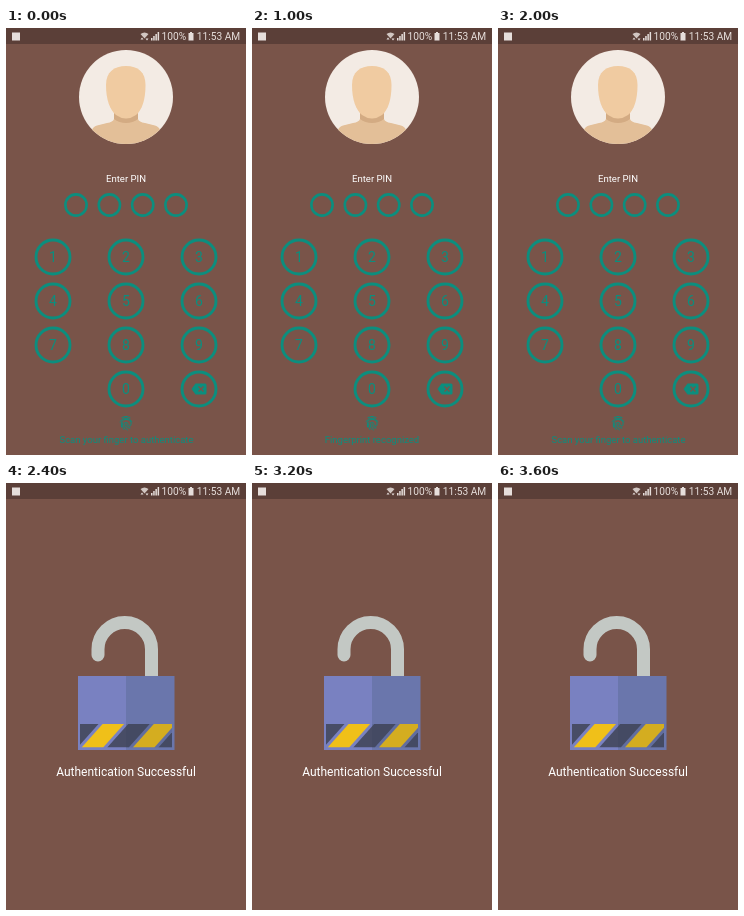
An HTML page that plays this animation: 240x427 px, repeating every 3.8 s.

```html
<!DOCTYPE html>
<html lang="en">
<head>
<meta charset="utf-8">
<title>PIN unlock</title>
<style>
  html, body { margin: 0; width: 100%; height: 100%; overflow: hidden; background: #795449; }
  svg { display: block; width: 100%; height: 100%; }
  text { font-family: Roboto, sans-serif; text-anchor: middle; }
  .line { fill: none; stroke: #0c8e7e; }
  .teal { fill: #0c8e7e; }
  .digit { font-size: 14px; }
  .hint { font-size: 9.5px; }
  .status { font-size: 10.2px; text-anchor: start; }
  .scan, .recognized, .success { animation: 3.8s step-end infinite; }
  .scan { animation-name: scan; }
  .recognized { animation-name: recognized; }
  .success { animation-name: success; }
  @keyframes scan {
    0% { opacity: 1 }
    26.3158% { opacity: 0 }
    52.6316%, 100% { opacity: 1 }
  }
  @keyframes recognized {
    0% { opacity: 0 }
    26.3158% { opacity: 1 }
    52.6316%, 100% { opacity: 0 }
  }
  @keyframes success {
    0% { opacity: 0 }
    57.8947% { opacity: .4 }
    63.1579%, 100% { opacity: 1 }
  }
</style>
</head>
<body>
<svg viewBox="0 0 240 427" preserveAspectRatio="none">
  <defs>
    <clipPath id="portrait"><circle cx="120" cy="69" r="47"/></clipPath>
    <clipPath id="band"><path d="M74 241H166V264.5H74Z"/></clipPath>
  </defs>
  <rect width="240" height="427" fill="#795449"/>

  <g clip-path="url(#portrait)">
    <path fill="#f3ebe4" d="M73 22H167V116H73Z"/>
    <path fill="#e3bf98" d="M108 80V91Q107 94 101 95L91 97.500Q83 100 82 117H158Q157 100 149 97.500L139 95Q133 94 132 91V80Z"/>
    <path fill="#d3ab83" d="M108 85H132V91Q127 95 120 95T108 91Z"/>
    <path fill="#f0cba1" d="M100 57C100 44 108 38 120 38S139.500 44 139.500 57C139.500 72 136 82 130 87Q120 94 110 87C104 82 100 72 100 57Z"/>
  </g>
  <text x="120" y="153.500" font-size="9.6" fill="#fff">Enter PIN</text>
  <g id="dots" class="line" stroke-width="2.6"></g>
  <g id="keys"></g>

  <g transform="translate(193 361)">
    <path class="teal" d="M-7.500 0L-3.500 -5.500H6Q7.500 -5.500 7.500 -4V4Q7.500 5.500 6 5.500H-3.500Z"/>
    <path d="M-.5 -2.500L4.500 2.500M4.500 -2.500L-.5 2.500" stroke="#795449" stroke-width="1.4"/>
  </g>

  <g class="line" stroke-width="1" stroke-linecap="round" transform="translate(120 395)">
    <path d="M-4 -5.500Q0 -8 4 -5.500M-6 -1.500Q0 -8.500 6 -1.500"/>
    <path d="M-4.500 4Q-6 -3.500 0 -3.500T5 1.500Q5 3 3.500 3T2 1.500Q2 -.5 0 -.5T-2 1.500Q-2 5 1.500 7"/>
    <path d="M-2 6.500Q-5 2 -3 -.5M0 1.500Q0 5 4 5"/>
  </g>
  <text class="teal hint scan" x="120.500" y="415">Scan your finger to authenticate</text>
  <text class="teal hint recognized" x="120" y="415">Fingerprint recognized</text>

  <g class="success">
    <rect width="240" height="427" fill="#795449"/>
    <path d="M92 172V166.300a26.750 26.750 0 0 1 53.500 0V195" fill="none" stroke="#c3c8c4" stroke-width="13" stroke-linecap="round"/>
    <path fill="#7981c1" d="M72 193H120V267H72Z"/>
    <path fill="#6a76ac" d="M120 193H168.500V267H120Z"/>
    <g id="stripes" clip-path="url(#band)"></g>
    <path fill="#303850" opacity=".14" d="M120 241H166V264.500H120Z"/>
    <text x="120" y="293" font-size="12" fill="#fff">Authentication Successful</text>
  </g>

  <rect width="240" height="16" fill="#5b3f38"/>
  <g fill="#e6dedb">
    <rect x="6" y="4.500" width="8" height="8"/>
    <path d="M134.500 6Q138.500 3 142.500 6L138.500 10.500Z" opacity=".85"/>
    <path d="M136 9.500L134.500 11.500H137.500ZM141 12.500L139.500 10.500H142.500Z"/>
    <path d="M145 10H146.500V12.500H145ZM147.200 8H148.700V12.500H147.200ZM149.400 6H150.900V12.500H149.400ZM151.600 4H153.100V12.500H151.600Z"/>
    <path d="M182.500 5H184V4H186V5H187.500V12.500H182.500Z"/>
    <text class="status" x="155.500" y="12">100%</text>
    <text class="status" x="190.800" y="12">11:53 AM</text>
  </g>
</svg>
<script>
  const fill = (id, parts) => {
    document.getElementById(id).innerHTML = parts.join('');
  };

  fill('dots', [70, 103.4, 136.7, 170].map(x =>
    `<circle cx="${x}" cy="177" r="10.6"/>`));

  fill('keys', [...'123456789 0<'].map((label, i) => {
    if (label === ' ') return '';
    const x = 47 + i % 3 * 73;
    const y = 229 + Math.floor(i / 3) * 44;
    const ring = `<circle class="line" cx="${x}" cy="${y}" r="17" stroke-width="2.9"/>`;
    return label === '<' ? ring
      : `${ring}<text class="teal digit" x="${x}" y="${y + 5}">${label}</text>`;
  }));

  // Slanted hazard stripes, alternating dark and yellow
  fill('stripes', [0, 1, 2, 3, 4].map(i =>
    `<path fill="${i % 2 ? '#f0c019' : '#484d66'}" d="M${71 + i * 25.6} 241h21.500l-21 23.500h-21.500z"/>`));
</script>
</body>
</html>
```
